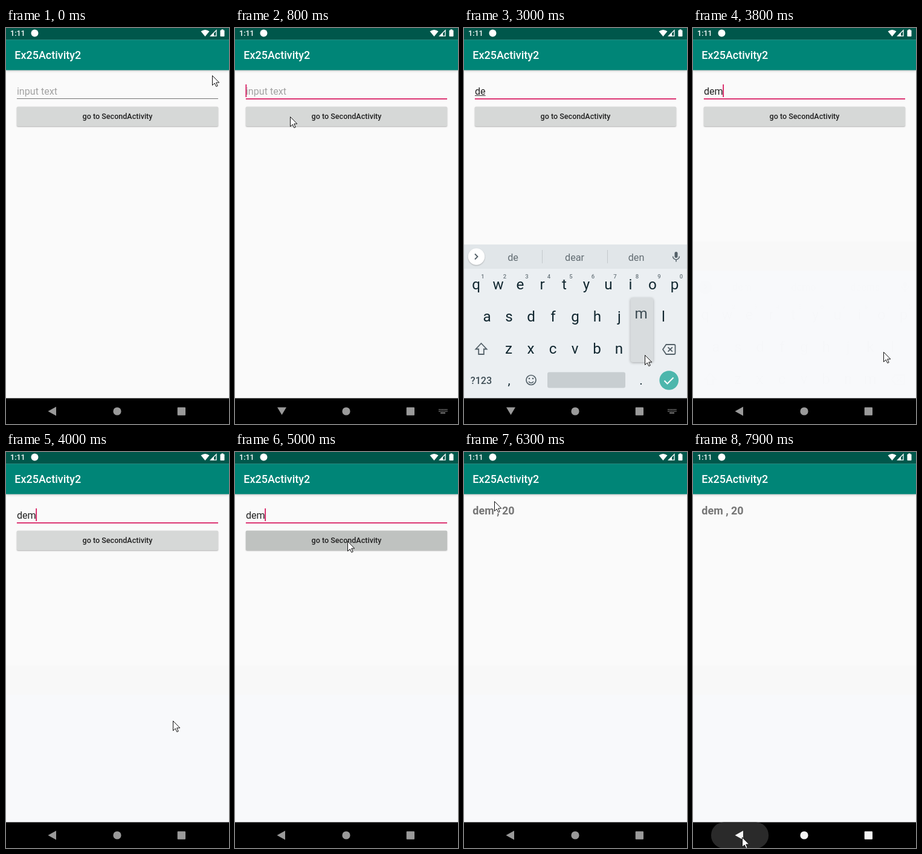
These frames come from a looping animation (369 px wide and 653 px high, 8 s). An HTML page with a canvas:

```html
<!DOCTYPE html>
<html lang="en">
<head>
<meta charset="utf-8">
<title>Two screens</title>
<style>
  html, body { margin: 0; width: 100%; height: 100%; overflow: hidden; background: #fafafa; }
  canvas { display: block; width: 369px; height: 653px; }
</style>
</head>
<body>
<canvas id="stage"></canvas>
<script>
const W = 369, H = 653, LOOP = 8000, STEP = 100;
const BAR_TOP = 19.2, BAR_BOTTOM = 69.4, NAV_TOP = 610.5, BOARD_TOP = 357;
const MARGIN = 14.35, FIELD_X = 17.94, FIELD_W = 333.1;
const BUTTON_Y = 129.8, BUTTON_H = 32.3;
const canvas = document.getElementById('stage');
const c = canvas.getContext('2d');
const dpr = window.devicePixelRatio || 1;
canvas.width = W * dpr;
canvas.height = H * dpr;

// Typed text, its suggestions, and when each state begins.
const typing = [
  { at: 0, text: '', words: null },
  { at: 1600, text: 'd', words: ['d', 'do', 'did'] },
  { at: 2400, text: 'de', words: ['de', 'dear', 'den'] },
  { at: 3100, text: 'dem', words: ['dem', 'demo', 'deems'] }
];
const presses = [
  { key: 'd', from: 1500, to: 1600 },
  { key: 'e', from: 2300, to: 2400 },
  { key: 'm', from: 2900, to: 3100 }
];
const FOCUS = 700, OPEN = 800, ENTER = 3600, PRESS = 4800, LAUNCH = 5200, BACK = 7800;

// Pointer tip: time, x, y
const pointerPath = [
  [0, 341, 78], [200, 215, 125], [400, 89, 109], [700, 89, 109],
  [1000, 95, 219], [1400, 82, 476], [1500, 97, 483], [1700, 97, 483],
  [2000, 95, 431], [2400, 95, 431], [2900, 299, 539], [3200, 299, 539],
  [3500, 335, 579], [3700, 335, 579], [4000, 276, 443], [4400, 225, 319],
  [4800, 186, 147], [5100, 186, 147], [5400, 209, 264], [5800, 39, 125],
  [6000, 2, 104], [6100, 13, 67], [6300, 50, 81], [6500, 45, 110],
  [6800, 45, 110], [7200, 102, 312], [7400, 110, 489], [7600, 81, 635], [8000, 81, 635]
];

const clamp = v => Math.max(0, Math.min(1, v));
const easeOut = u => 1 - (1 - clamp(u)) ** 3;

function rect(x, y, w, h, fill, radius = 0) {
  c.fillStyle = fill;
  c.beginPath();
  c.roundRect(x, y, w, h, radius);
  c.fill();
}
function disc(x, y, r, fill) {
  c.fillStyle = fill;
  c.beginPath();
  c.arc(x, y, r, 0, Math.PI * 2);
  c.fill();
}
function shape(d, fill) {
  c.fillStyle = fill;
  c.fill(new Path2D(d));
}
function line(d, color, width = 1.8) {
  c.strokeStyle = color;
  c.lineWidth = width;
  c.stroke(new Path2D(d));
}
function text(str, x, y, size, color, weight = 400, align = 'left') {
  c.font = `${weight} ${size}px Roboto, sans-serif`;
  c.textAlign = align;
  c.fillStyle = color;
  c.fillText(str, x, y);
  return c.measureText(str).width;
}
function withShadow(blur, dy, alpha, draw) {
  c.save();
  c.shadowColor = `rgba(0,0,0,${alpha})`;
  c.shadowBlur = blur * dpr;
  c.shadowOffsetY = dy * dpr;
  draw();
  c.restore();
}

// Background and bars shared by both screens
function drawWindow(tinted) {
  rect(0, 0, W, H, '#fafafa');
  if (tinted) {
    rect(0, 352, W, 48, '#f8f8f8');
    rect(0, 400, W, 211, '#f8f9fb');
  }
  withShadow(4, 1, 0.3, () => rect(0, BAR_TOP, W, BAR_BOTTOM - BAR_TOP, '#008577'));
  rect(0, 0, W, BAR_TOP, '#00574b');
  text('Ex25Activity2', MARGIN, 50.5, 17.95, '#fff', 500);
}

function drawForm(t) {
  drawWindow(t >= ENTER);
  const state = typing.findLast(s => t >= s.at);
  const focused = t >= FOCUS;
  let width = 0;
  if (state.text) {
    width = text(state.text, FIELD_X, 109.8, 16.15, '#222');
    if (t < ENTER) rect(FIELD_X, 111, width, 1, '#333');
  } else {
    text('input text', FIELD_X, 109.8, 16.15, '#a2a2a2');
  }
  if (focused) rect(FIELD_X, 116, FIELD_W, 1.8, '#d81b60');
  else rect(FIELD_X, 116, FIELD_W, 0.9, '#757575');

  const blinkStart = t >= ENTER ? ENTER : Math.max(FOCUS, state.at);
  if (focused && (t - blinkStart) % 1000 < 500) rect(FIELD_X + width - 0.5, 93, 1.8, 21, '#d81b60');

  withShadow(2, 1, 0.3, () => rect(FIELD_X, BUTTON_Y, FIELD_W, BUTTON_H, '#d6d8d7', 1.8));
  const ripple = clamp((t - PRESS + STEP) / 300);
  if (ripple) {
    c.save();
    c.beginPath();
    c.roundRect(FIELD_X, BUTTON_Y, FIELD_W, BUTTON_H, 1.8);
    c.clip();
    disc(187, 148, 180 * ripple, '#bfc2c0');
    c.restore();
  }
  text('go to SecondActivity', W / 2, 150.3, 12.56, '#202020', 500, 'center');
}

function drawResult() {
  drawWindow(true);
  text('dem , 20', MARGIN, 102.8, 17.95, '#757575', 700);
}

function drawScreens(t) {
  const p = 1 - (1 - clamp((t - LAUNCH) / 425)) ** 4;
  if (p < 1) {
    c.save();
    c.translate(0, -0.02 * H * p);
    drawForm(t);
    c.restore();
  }
  if (p > 0) {
    const top = H * 0.96 * (1 - p);
    c.save();
    c.beginPath();
    c.rect(0, top, W, H - top);
    c.clip();
    c.translate(0, 0.041 * H * (1 - p));
    drawResult();
    c.restore();
  }
}

const INK = '#10262f', GREY = '#536068';
const keyRows = [
  { keys: 'qwertyuiop', x: 20, y: 423 },
  { keys: 'asdfghjkl', x: 38, y: 476 },
  { keys: 'zxcvbnm', x: 74, y: 529 }
];
const KEY_STEP = 36.5;

function drawToolbar(words) {
  rect(0, BOARD_TOP, W, 40, '#e1e6e9');
  withShadow(2, 1, 0.25, () => disc(20.5, 377, 13.7, '#fff'));
  line(words ? 'M18 372.5l4.5 4.5-4.5 4.5' : 'M22.5 372.5l-4.5 4.5 4.5 4.5', GREY);
  if (words) {
    words.forEach((word, i) => text(word, 81 + i * 102, 383.5, 16.2, '#626c72', 400, 'center'));
    rect(129, 366, 1, 22, '#c3c9cc');
    rect(237, 366, 1, 22, '#c3c9cc');
  } else {
    line('M73 375.5a4.8 4.8 0 1 1-9.6 0a4.8 4.8 0 1 1 9.6 0M71.7 379l5.5 5.5', GREY, 2);
    line('M119 371h9q2 0 2 2v6l-4 5h-7q-2 0-2-2v-9q0-2 2-2M130 379h-4v5M120 378q2 4 5 1M120.5 375h1.5M125 375h1.5', GREY, 1.7);
    c.letterSpacing = '1px';
    text('GIF', 177.5, 381, 11.5, GREY, 700, 'center');
    c.letterSpacing = '0px';
    rect(226, 370.5, 13, 13, GREY, 1);
    rect(264.5, 367, 1, 20, '#c8ced1');
    for (const x of [292.5, 298, 303.5]) disc(x, 377.5, 1.7, GREY);
  }
  rect(348.5, 369, 5, 10, GREY, 2.5);
  line('M345.6 376.5a5.4 5.4 0 0 0 10.8 0M351 382v3.5', GREY, 1.5);
}

function drawKeys(t) {
  rect(0, 397, W, 214, '#ebeff2');
  keyRows.forEach((row, r) => [...row.keys].forEach((key, i) => {
    const x = row.x + i * KEY_STEP;
    text(key, x, row.y + 8, 24.2, INK, 400, 'center');
    if (r === 0) text(String((i + 1) % 10), x + 11, 413, 9.5, '#68747b', 500, 'center');
  }));
  line('M28.5 520l9 9.5h-4.7v8.5h-8.6v-8.5h-4.7z', GREY);
  line('M334.5 522h13q2 0 2 2v12q0 2-2 2h-13l-5.5-8zM337.5 526.3l7.4 7.4M344.9 526.3l-7.4 7.4', GREY);

  text('?123', 28.5, 586.5, 16.2, '#3f4e56', 500, 'center');
  text(',', 74.5, 588, 21, INK, 400, 'center');
  text('.', 293, 588, 21, INK, 400, 'center');
  line('M119 580.5a8 8 0 1 1-16 0a8 8 0 1 1 16 0M107 583q4 4.5 8 0', GREY, 1.7);
  disc(108, 578, 1.3, GREY);
  disc(114, 578, 1.3, GREY);
  rect(138, 567.5, 129, 26, '#c8ced1', 3);
  disc(339.2, 581, 15.8, '#4db6ac');
  line('M331.5 581.5l5 5 10-10', '#fff', 2);

  const press = presses.find(p => t >= p.from && t < p.to);
  if (!press) return;
  const row = keyRows.find(r => r.keys.includes(press.key));
  const x = row.x + row.keys.indexOf(press.key) * KEY_STEP;
  withShadow(4, 1, 0.3, () => rect(x - 17.5, row.y - 84, 37.5, 106, '#d8dcde', 4));
  text(press.key, x, row.y - 50, 24.2, '#3c4b53', 400, 'center');
}

function drawKeyboard(t) {
  const shown = easeOut((t - OPEN) / 300) * (1 - easeOut((t - ENTER) / 250));
  if (!shown) return;
  c.save();
  c.globalAlpha = shown;
  c.translate(0, 50 * (1 - shown));
  drawToolbar(typing.findLast(s => t >= s.at).words);
  drawKeys(t);
  c.restore();
}

function drawStatus() {
  text('1:11', 7, 13.3, 12.56, '#fff', 500);
  disc(47.5, 8.5, 6, '#fff');
  shape('M322.5 5.5q7-5 14 0l-7 8.5z', '#fff');
  line('M348 3.8v9.4h-9.4z', '#fff', 1.3);
  shape('M344 8l-5.4 5.4h5.4z', '#fff');
  rect(354.5, 3.5, 7, 10.5, '#fff', 1);
  rect(356.5, 2.3, 3, 2, '#fff');
}

function drawNavigation(t) {
  rect(0, NAV_TOP, W, H - NAV_TOP, '#000');
  const pressed = clamp((t - BACK + STEP) / 200);
  if (pressed) {
    const half = 47.5 * pressed;
    rect(77.5 - half, NAV_TOP, 2 * half, 43, `rgba(42,42,42,${pressed})`, 21);
  }
  const level = 154 + 90 * pressed;
  const icon = `rgb(${level},${level},${level})`;
  const keyboard = t >= OPEN && t < ENTER + 100;
  shape(keyboard ? 'M70 625.5h15l-7.5 12.5z' : 'M69.5 632l13.5-7.5v15z', icon);
  disc(184, 632, 6.6, icon);
  rect(283.7, 625.5, 13.3, 13.3, icon, 1);
  if (keyboard) {
    for (let row = 0; row < 2; row++)
      for (let i = 0; i < 6; i++) rect(337.3 + i * 2.5, 628.5 + row * 2.7, 1.5, 1.5, icon);
    rect(340, 634, 8, 1.5, icon);
  }
}

function drawPointer(t) {
  const i = pointerPath.findIndex(p => p[0] > t);
  const [t0, x0, y0] = pointerPath[i - 1], [t1, x1, y1] = pointerPath[i];
  const u = (t - t0) / (t1 - t0);
  c.save();
  c.translate(Math.round(x0 + (x1 - x0) * u) + 0.5, Math.round(y0 + (y1 - y0) * u) + 0.5);
  const arrow = 'M0 0v16l3.7-3.5 2.6 5.5 2.4-1-2.5-5.5h5.1z';
  shape(arrow, '#fff');
  line(arrow, '#111', 1);
  c.restore();
}

function frame(now) {
  const t = Math.floor((now % LOOP) / STEP) * STEP;
  c.setTransform(dpr, 0, 0, dpr, 0, 0);
  drawScreens(t);
  drawStatus();
  drawKeyboard(t);
  drawNavigation(t);
  drawPointer(t);
  requestAnimationFrame(frame);
}
frame(0);
</script>
</body>
</html>
```
